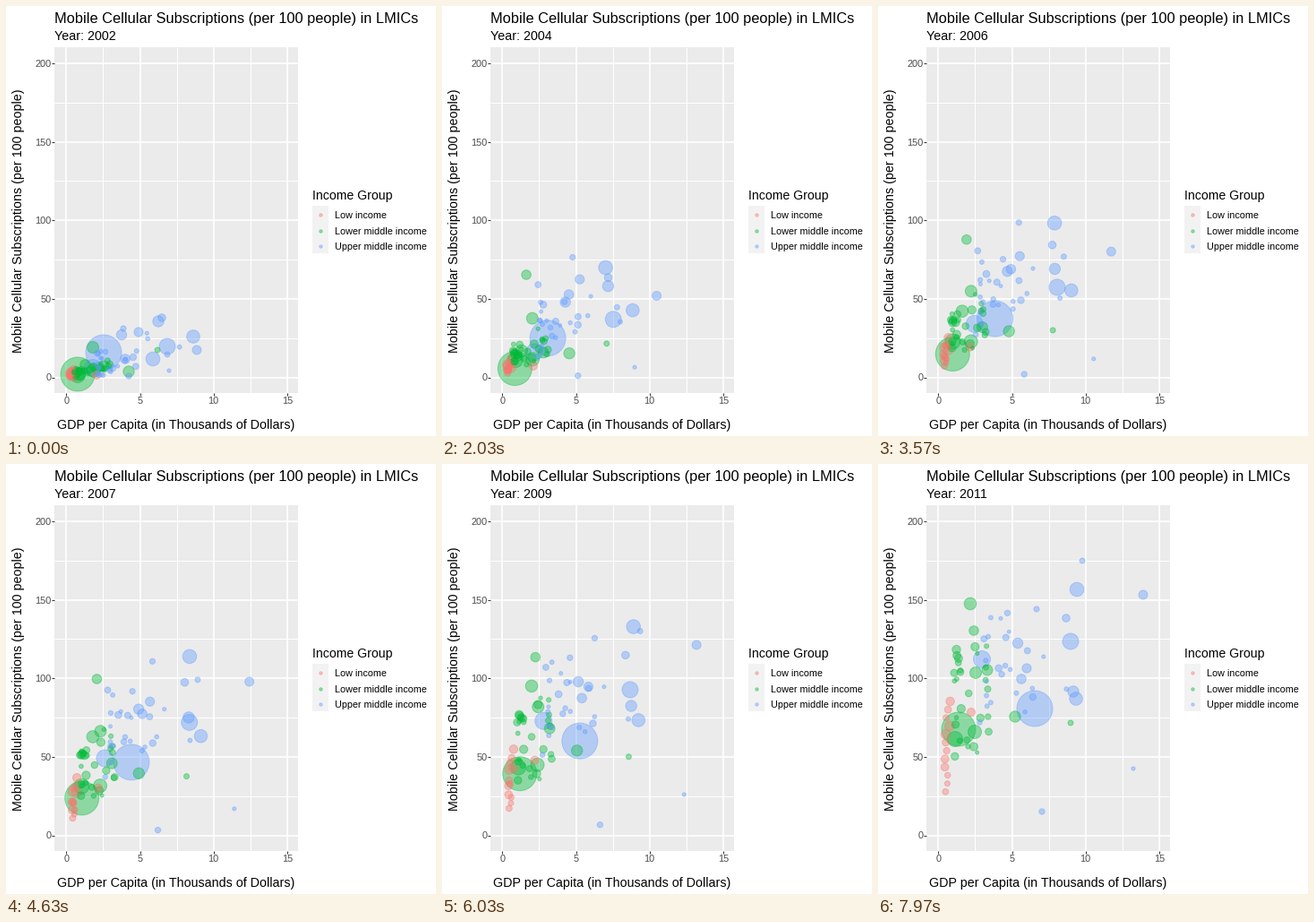
A matplotlib script that plays this animation: 480 px wide and 480 px high, repeating every 8000 ms.

```python
import random

import matplotlib.pyplot as plt
import numpy as np
from matplotlib.animation import FuncAnimation
from matplotlib.patches import Rectangle

SIZE, DPI = 480, 100
PT = 72 / DPI
FRAMES, LOOP_MS = 240, 8000
HOLD, FRAMES_PER_YEAR = 10, 23.06
FIRST_YEAR = 2002
SALMON, GREEN, BLUE = "#F8766D", "#00BA38", "#619CFF"

# Leading bubbles: radius, first x, last x, first y, last y, easing power.
UPPER = [
    (20.5, 109, 175, 387, 273, 1.28),
    (10, 97, 116, 404, 218, 1.55),
    (9.5, 180, 215, 380, 198, 1.18),
    (8.3, 164, 222, 394, 140, .6),
    (7.8, 209, 221, 369, 262, .85),
    (6.7, 170, 218, 352, 254, .6),
    (6.2, 129, 156, 367, 200, 1),
    (5.5, 213, 296, 384, 146, .9),
    (2.6, 182, 285, 407, 340, 1.9),
    (3.7, 137, 183, 413, 388, 3),
    (5.8, 133, 160, 394, 240, .5),
    (5.6, 148, 166, 364, 228, .55),
    (4.8, 174, 210, 348, 172, .9),
    (3.6, 131, 177, 360, 162, .6),
    (3.5, 180, 228, 389, 108, 1.1),
]
LOWER = [
    (19.5, 80, 90, 411, 296, 1.9),
    (7, 97, 109, 381, 233, 1),
    (7.3, 82, 103, 411, 156, 1.5),
    (8, 98, 108, 407, 299, 1.4),
    (9, 80, 86, 412, 307, 1.2),
    (5.8, 88, 107, 400, 186, .5),
    (6.7, 137, 153, 408, 282, 1.2),
    (6.5, 109, 122, 402, 230, 1.6),
    (3.5, 169, 215, 384, 289, 1.7),
]

rng = random.Random(12)
uni = rng.uniform


def small_upper():
    x = 102 + 95 * rng.random() ** 1.5
    start = min(412, 405 - .25 * (x - 102) + uni(-28, 12))
    return uni(2.2, 4.4), x, x + uni(8, 32), start, uni(165, 290), uni(.6, 1.2)


def small_lower():
    x = 76 + 42 * rng.random() ** 2
    start = min(414, 413 - .3 * (x - 76) + uni(-6, 3))
    return uni(2.5, 5.3), x, x + uni(4, 15), start, uni(200, 335), uni(1, 1.6)


def small_low(i, count):
    x = uni(70, 76)
    return uni(3, 6), x, x + uni(2, 5), uni(406, 414), 265 + 110 * i / count, uni(1.5, 1.9)


groups = (
    (UPPER + [small_upper() for _ in range(24)], BLUE),
    (LOWER + [small_lower() for _ in range(28)], GREEN),
    ([small_low(i, 12) for i in range(12)] + [(5, 101, 104, 412, 277, 1.7)], SALMON),
)
bubbles = sorted(((*row, color) for rows, color in groups for row in rows),
                 key=lambda b: -b[0])
radii, x0, x1, y0, y1, power = np.array([b[:-1] for b in bubbles]).T
colors = [b[-1] for b in bubbles]


def positions(frame):
    p = max(0, frame - HOLD) / (FRAMES - 1 - HOLD)
    # The largest economies accelerate; the rest slow down late.
    px = np.where(radii > 15, p ** 1.3, p + .6 * p * (1 - p))
    return np.column_stack([x0 + (x1 - x0) * px, y0 + (y1 - y0) * p ** power])


plt.rcParams["font.family"] = "Liberation Sans"
fig = plt.figure(figsize=(SIZE / DPI, SIZE / DPI), dpi=DPI, facecolor="white")
ax = fig.add_axes([0, 0, 1, 1])
ax.set_xlim(0, SIZE)
ax.set_ylim(SIZE, 0)
ax.axis("off")


def text(x, y, s, px, color="black", **kw):
    kw.setdefault("va", "baseline")
    return ax.text(x, y, s, fontsize=px * PT, color=color, **kw)


def box(x, y, w, h, color):
    ax.add_patch(Rectangle((x, y), w, h, facecolor=color, edgecolor="none", zorder=0))


def line(xx, yy, color, px):
    ax.plot(xx, yy, color=color, lw=px * PT, solid_capstyle="butt", zorder=1)


def dots(points, r, color):
    return ax.scatter(*np.transpose(points), s=((2 * np.asarray(r) - 1) * PT) ** 2,
                      c=color, edgecolors=color, alpha=.4, linewidths=PT, zorder=3)


LEFT, TOP, RIGHT, BOTTOM = 54, 46, 326, 432


def gx(value):
    return 67.3 + 16.44 * value


def gy(value):
    return 414.5 - 1.753 * value


box(LEFT, TOP, RIGHT - LEFT, BOTTOM - TOP, "#EBEBEB")
for i in range(7):
    line([gx(2.5 * i)] * 2, [TOP, BOTTOM], "white", 1 if i % 2 else 1.6)
for i in range(9):
    line([LEFT, RIGHT], [gy(25 * i)] * 2, "white", 1 if i % 2 else 1.6)
for v in range(0, 16, 5):
    line([gx(v)] * 2, [BOTTOM, BOTTOM + 3], "#333333", 1)
    text(gx(v), 444, str(v), 11, "#4D4D4D", ha="center")
for v in range(0, 201, 50):
    line([LEFT - 3, LEFT], [gy(v)] * 2, "#333333", 1)
    text(51, gy(v) + 4, str(v), 11, "#4D4D4D", ha="right")

METRIC = "Mobile Cellular Subscriptions (per 100 people)"
text(54, 19, METRIC + " in LMICs", 16.4)
subtitle = text(54, 38, "", 14.25)
text(190, 472, "GDP per Capita (in Thousands of Dollars)", 14.25, ha="center")
text(18, 239.5, METRIC, 14.2, rotation=90, rotation_mode="anchor", ha="center")

text(342, 216, "Income Group", 14.1)
box(342, 223, 18, 53, "#F2F2F2")
for i, (label, color) in enumerate((("Low income", SALMON),
                                    ("Lower middle income", GREEN),
                                    ("Upper middle income", BLUE))):
    y = 233 + 17.6 * i
    dots([(351, y)], 2.2, color)
    text(367, y + 4, label, 10.8)

cloud = dots(positions(0), radii, colors)


def update(frame):
    cloud.set_offsets(positions(frame))
    year = FIRST_YEAR + int(max(0, frame - HOLD) / FRAMES_PER_YEAR)
    subtitle.set_text(f"Year: {year}")
    return cloud, subtitle


anim = FuncAnimation(fig, update, frames=FRAMES, interval=LOOP_MS / FRAMES,
                     repeat=True, repeat_delay=0)
plt.show()
```
